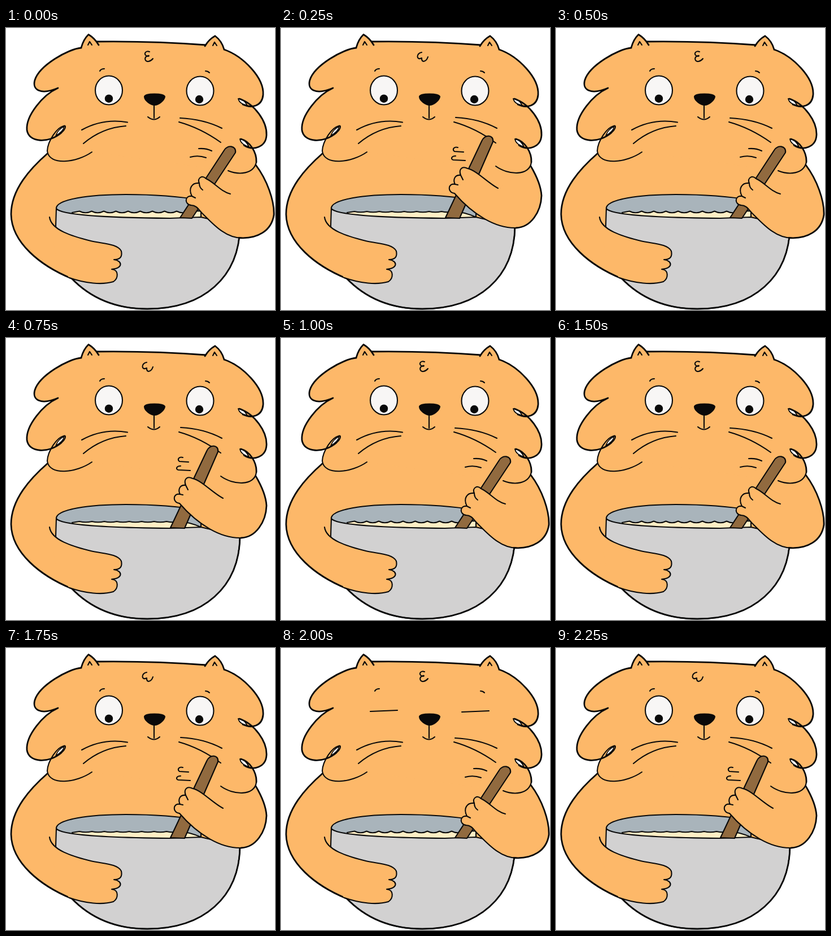
These frames come from a looping animation (476x498 px, 2.5 s). An HTML page:

```html
<!DOCTYPE html>
<html lang="en">
<head>
<meta charset="utf-8">
<title>Cat stirring batter</title>
<style>
html, body { margin: 0; width: 100%; height: 100%; overflow: hidden; background: #fff; }
svg { display: block; width: 100vw; height: 100vh; }
.fur { fill: #fdb869; }
.back { fill: #a9b4bb; }
.bowl { fill: #d2d1d1; }
.batter { fill: #ffeec5; }
.wood { fill: #916a3f; }
.ink { fill: #090909; }
.white { fill: #fff; }
.eye { fill: #f8f6f5; }
.edge { stroke-width: 2.8; }
.bare { stroke: none; }
</style>
</head>
<body>
<svg viewBox="0 0 476 498" fill="none" stroke="#090909" stroke-width="2.1" stroke-linecap="round" stroke-linejoin="round">
  <!-- torso and head -->
  <path class="fur bare" d="M74 221C43 248 9 285 9 329C10 380 62 420 115 442L330 442L412 360L443 240L380 200L100 200Z"/>
  <path class="edge" d="M74 221C43 248 9 285 9 329C10 380 62 420 115 442"/>
  <path class="fur bare" d="M133 35L162 24C230 23 290 25 354 30L386 38C420 50 457 88 455 118C454 141 428 144 414 129L412 125C440 134 462 165 461 189C460 213 434 218 417 200L415 196C431 200 444 219 443 237C437 258 413 259 390 252L152 219C125 238 76 247 73 217C74 199 87 180 100 174L103 179C76 204 40 204 37 180C35 155 65 120 92 106C61 119 46 109 51 92C59 66 110 37 133 35Z"/>
  <path class="white" stroke-width="1.8" d="M411 125Q420 124 427 137Q413 134 411 125ZM414 196Q424 197 430 210Q415 205 414 196Z"/>
  <path class="white" stroke-width="1.5" d="M103 174Q101 183 88 190Q93 178 103 174Z"/>
  <path class="edge" d="M133 35C110 37 59 66 51 92C46 109 61 119 92 106C65 118 35 155 37 180C40 203 76 204 98 185M158 24C230 23 290 25 354 30M386 38C420 50 457 88 455 118C453 139 434 142 419 135M413 125C440 134 462 165 461 189C460 210 438 218 421 207M416 196C431 200 444 219 443 237"/>
  <path d="M98 185C106 178 107 171 102 173C90 176 74 199 73 217C76 244 125 238 152 219"/>
  <path class="fur edge" d="M133 35Q137 20 146 11.500Q157 18 164 30M352 32Q359 20 370 14Q382 23 386 38"/>
  <path d="M145 30L148 24L152 30M366 31L369 25L373 31"/>

  <!-- face -->
  <path d="M166 76Q168 72 174 72M353 76Q357 76 360 79M262 136V159M251 157Q262 166 272 157M134 180Q172 159 215 166.500M137 204Q170 176 212 173"/>
  <path class="ink" d="M245 121C247 115 278 115 281 121C280 128 270 136 263 136C256 136 245 128 245 121Z"/>
  <g id="open">
    <ellipse class="eye" cx="182" cy="110" rx="24" ry="25.5"/>
    <ellipse class="eye" cx="343.5" cy="111" rx="24" ry="25.5"/>
    <circle class="ink bare" cx="182" cy="124.7" r="7.2"/>
    <circle class="ink bare" cx="342" cy="126" r="7.2"/>
  </g>
  <path id="shut" d="M158 112L206 110M320 113L368 111"/>

  <!-- bowl -->
  <path class="back" d="M89 320C86 302 150 294 212 294C262 294 304 297 345 304V345H120Z"/>
  <path id="batter" class="batter"/>
  <path class="bowl" d="M89 319C98 330 170 335 290 336L345 334L414 350C413 440 350 496 250 496C200 496 152 480 115 441L88 350Z"/>
  <path class="edge" d="M414 350C413 440 350 496 250 496C200 496 152 480 115 441"/>

  <!-- holding arm -->
  <path class="fur bare" d="M77 334C80 357 118 368 150 376C172 381 198 381 204 394C206 403 203 409 191 409C207 411 207 425 187 426C200 427 199 442 190 448C170 454 140 451 112 441L90 415Z"/>
  <path d="M77 334C80 357 118 368 150 376C172 381 198 381 204 394C206 403 203 409 191 409C207 411 207 425 187 426C200 427 199 442 190 448C170 454 140 451 112 441"/>

  <!-- stirring, far and near -->
  <g id="far">
    <path d="M254 42C246 39 242 48 251 50C254 50 253 48 251 49C244 51 245 60 252 59Q257 58 260 54M308 159Q350 161 382 177M306 166Q345 177 380 202M341 213Q354 212 364 217M326 228Q340 224 354 229"/>
    <path class="wood" d="M308 335L386 216C391 206 408 207 406 220L329 336Z"/>
    <path class="fur bare" d="M397 293C380 289 368 272 354 266C347 259 338 265 342 274C329 273 322 282 329 297C316 295 315 312 328 313C337 313 341 321 347 327C366 346 388 371 418 371C445 371 470 358 474 330C475 305 462 268 442 239Z"/>
    <path d="M397 293C380 289 368 272 354 266C347 259 338 265 342 274C342 280 345 284 348 286M342 274C329 273 322 283 329 297L335 300M329 297C316 295 315 312 328 313C337 313 341 321 347 327C366 346 388 371 418 371M393 252C413 260 438 258 443 237"/>
    <path class="edge" d="M412 370.500C445 373 470 358 474 330C475 305 462 268 442 242"/>
  </g>
  <g id="near">
    <path d="M249 43C239 44 239 58 249 53C248 62 257 60 260 51M309 158Q350 160 382 177M306 166Q345 177 380 203M313 211C305 209 303 215 307 218L323 219M309 226C301 226 300 232 305 233L326 234"/>
    <path class="wood" d="M291 335L355 200C360 187 377 188 375 201L316 336Z"/>
    <path class="fur bare" d="M384 283C365 273 347 252 330 248C320 243 314 250 318 260C307 260 304 268 308 276C295 275 295 291 307 292C340 330 380 354 416 353C442 352 460 325 461 296C460 279 452 261 442 247Z"/>
    <path d="M384 283C365 273 347 252 330 248C320 243 314 250 318 260L322 268M318 260C307 259 304 268 308 276L313 277M308 276C295 273 294 291 307 292C340 330 380 354 416 353M380 244C402 260 440 262 443 237"/>
    <path class="edge" d="M416 353C442 352 460 325 461 296C460 279 452 261 442 244"/>
  </g>
</svg>
<script>
const $ = id => document.getElementById(id);
const show = (id, on) => { $(id).style.display = on ? "" : "none"; };
const STEP = 250, STEPS = 10;

// Scalloped batter surface; its lower part lies behind the bowl
function surface(y, count, width, depth, end) {
  const bump = `q${width / 2} ${depth} ${width} 0`;
  return `M117 326L130 ${y}${bump.repeat(count)}${end}V345H130Z`;
}
const waves = [
  surface(323.5, 9, 21.5, 5.5, "L345 323"),
  surface(324, 8, 22, 2.5, "Q325 325 345 334")
];

let last = -1;
function draw(now) {
  const step = Math.floor(now / STEP) % STEPS;
  if (step !== last) {
    const near = step % 2;
    show("far", !near);
    show("near", near);
    show("open", step !== 8);
    show("shut", step === 8);
    $("batter").setAttribute("d", waves[near]);
    last = step;
  }
  requestAnimationFrame(draw);
}
draw(performance.now());
</script>
</body>
</html>
```
